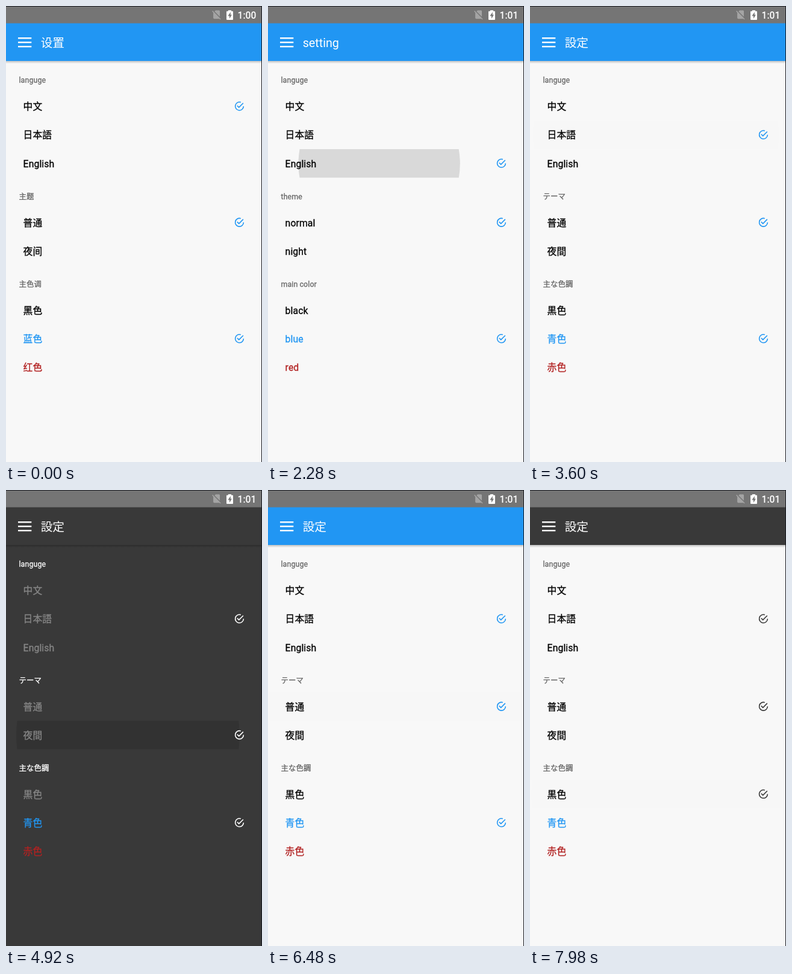
Recreate the animation shown at these times as an HTML page. Size 425 by 755 pixels, loop 8 s.

```html
<!DOCTYPE html>
<html lang="zh">
<head>
<meta charset="utf-8">
<style>
  html, body { margin: 0; width: 100%; height: 100%; overflow: hidden; }
  svg { display: block; width: 425px; height: 755px; }
  text { font-family: Roboto, "Noto Sans CJK SC", "Noto Sans CJK", sans-serif; stroke-width: 0; }
  [lang=ja] text { font-family: Roboto, "Noto Sans CJK JP", "Noto Sans CJK", sans-serif; }
  .list text { stroke-width: .3px; letter-spacing: .1px; }
</style>
</head>
<body>
<svg id="stage" viewBox="0 0 425 755"></svg>
<script>
const LOOP = 8000, STEP = 60, FADE = 150;
const WIDTH = 425, HEIGHT = 755, PITCH = 47.25;
const BLUE = '#2196f3', RED = '#b22222', DARK = '#393939', EDGE = '#16181f';
const ACCENTS = [DARK, BLUE, RED];
const LANGS = ['zh', 'ja', 'en'];
const stage = document.getElementById('stage');

// Title, then each section: its head followed by its options
const langSection = ['languge', '中文', '日本語', 'English'];
const PAGES = {
  zh: ['设置', langSection, ['主题', '普通', '夜间'], ['主色调', '黑色', '蓝色', '红色']],
  ja: ['設定', langSection, ['テーマ', '普通', '夜間'], ['主な色調', '黒色', '青色', '赤色']],
  en: ['setting', langSection, ['theme', 'normal', 'night'], ['main color', 'black', 'blue', 'red']]
};

// grow: how far the ripple has spread when the screen reacts; hold: delay before it fades
const TAPS = [
  { at: 2280, section: 0, option: 2, grow: .63 },
  { at: 3480, section: 0, option: 1, grow: .8 },
  { at: 4920, section: 1, option: 1, grow: .87, hold: 1380 },
  { at: 6300, section: 1, option: 0, grow: .95, hold: STEP },
  { at: 7140, section: 2, option: 2, grow: .9 },
  { at: 7860, section: 2, option: 0, grow: .9 }
];

const headY = section => 122.9 + section * 192.4 - (section > 1 ? PITCH : 0);
const rowY = (section, option) => headY(section) + 43.6 + option * PITCH;
const mix = (a, b, p) => a + (b - a) * p;

const rect = (x, y, w, h, fill) =>
  `<rect x="${x}" y="${y}" width="${w}" height="${h}" fill="${fill}"/>`;

const label = (x, y, size, color, words, weight = 400) =>
  `<text x="${x}" y="${Math.round(y)}" font-size="${size}" font-weight="${weight}"
    fill="${color}" stroke="${color}">${words}</text>`;

const check = (y, color) =>
  `<g transform="translate(378.3 ${y - 9.8}) scale(.765)" fill="none" stroke="${color}" stroke-width="2.1">
    <path d="M21 12A9 9 0 1 1 15 3.5M7.2 10.8L11 14.6L20.3 5.3"/></g>`;

function statusBar(clock) {
  return rect(0, 0, WIDTH, 29, '#757575') +
    `<path transform="translate(340.2 4.8) scale(.78)" fill="#a4a4a4" d="M19 5c0-1.1-.9-2-2-2h-7L7.7 5.3 19 16.7zM3.7 3.9L2.4 5.2 5 7.8V19c0 1.1.9 2 2 2h10c.4 0 .7-.1 1-.3l1.9 1.9 1.2-1.2z"/>
    <path fill="#fff" d="M369 7h5v1.5h2q1 0 1 1v12.5q0 1-1 1h-9q-1 0-1-1v-12.5q0-1 1-1h2z"/>
    <path fill="#757575" d="M373 10L368.3 16.4H371V21L374.9 14.6H372.6z"/>` +
    label(384.6, 20.6, 15.6, '#fff', clock, 500);
}

function header(title, color) {
  const bars = [0, 1, 2].map(i => rect(20, 52 + 7 * i, 22.3, 2.4, '#fff')).join('');
  return `<linearGradient id="shade" x2="0" y2="1">
      <stop stop-opacity=".22"/><stop offset="1" stop-opacity="0"/></linearGradient>` +
    rect(0, 91, WIDTH, 4.5, 'url(#shade)') + rect(0, 28.6, WIDTH, 62.4, color) +
    bars + label(57.7, 68, 19.7, '#fff', title);
}

// The circle drifts from the finger to the row's middle while it spreads and fades
function ripple({ at, section, option, grow, hold = 0 }, t) {
  const age = Math.floor((t - at) / STEP) * STEP - hold;
  const fade = Math.min(Math.max(age / FADE, 0), 1);
  if (fade === 1) return '';
  const spread = mix(grow, 1, fade);
  const y = rowY(section, option);
  return `<clipPath id="row">${rect(0, y - PITCH / 2 - .5, WIDTH, PITCH, '#000')}</clipPath>
    <circle cx="${mix(138, 212, spread)}" cy="${y}" r="${213 * spread}"
      opacity="${.125 * (1 - fade) ** 2}" clip-path="url(#row)"/>`;
}

function list(sections, chosen, night) {
  const tick = night ? '#fff' : ACCENTS[chosen[2]];
  return sections.map(([head, ...options], s) =>
    label(21.5, headY(s) + 4.4, 12.4, night ? '#fff' : '#666', head) +
    options.map((word, i) => {
      const ink = s === 2 && i > 0 ? ACCENTS[i] : night ? '#868686' : '#000';
      return label(28.6, rowY(s, i) + 5.6, 15.75, ink, word);
    }).join('') +
    check(rowY(s, chosen[s]), tick)
  ).join('');
}

function scene(t) {
  const chosen = [0, 0, 1];
  const taps = TAPS.filter(tap => tap.at <= t);
  taps.forEach(tap => chosen[tap.section] = tap.option);

  const lang = LANGS[chosen[0]], night = chosen[1] === 1;
  const [title, ...sections] = PAGES[lang];
  return `<g lang="${lang === 'ja' ? 'ja' : 'zh'}">` +
    rect(0, 0, WIDTH, HEIGHT, night ? DARK : '#f8f8f8') +
    taps.slice(-1).map(tap => ripple(tap, t)).join('') +
    statusBar(t < 300 ? '1:00' : '1:01') +
    header(title, night ? DARK : ACCENTS[chosen[2]]) +
    `<g class="list">${list(sections, chosen, night)}</g>` +
    rect(0, 0, WIDTH, 1, EDGE) + rect(WIDTH - 1, 0, 1, HEIGHT, EDGE) + '</g>';
}

let shown = '';
function play() {
  const next = scene(performance.now() % LOOP);
  if (next !== shown) stage.innerHTML = shown = next;
  requestAnimationFrame(play);
}
play();
</script>
</body>
</html>
```
